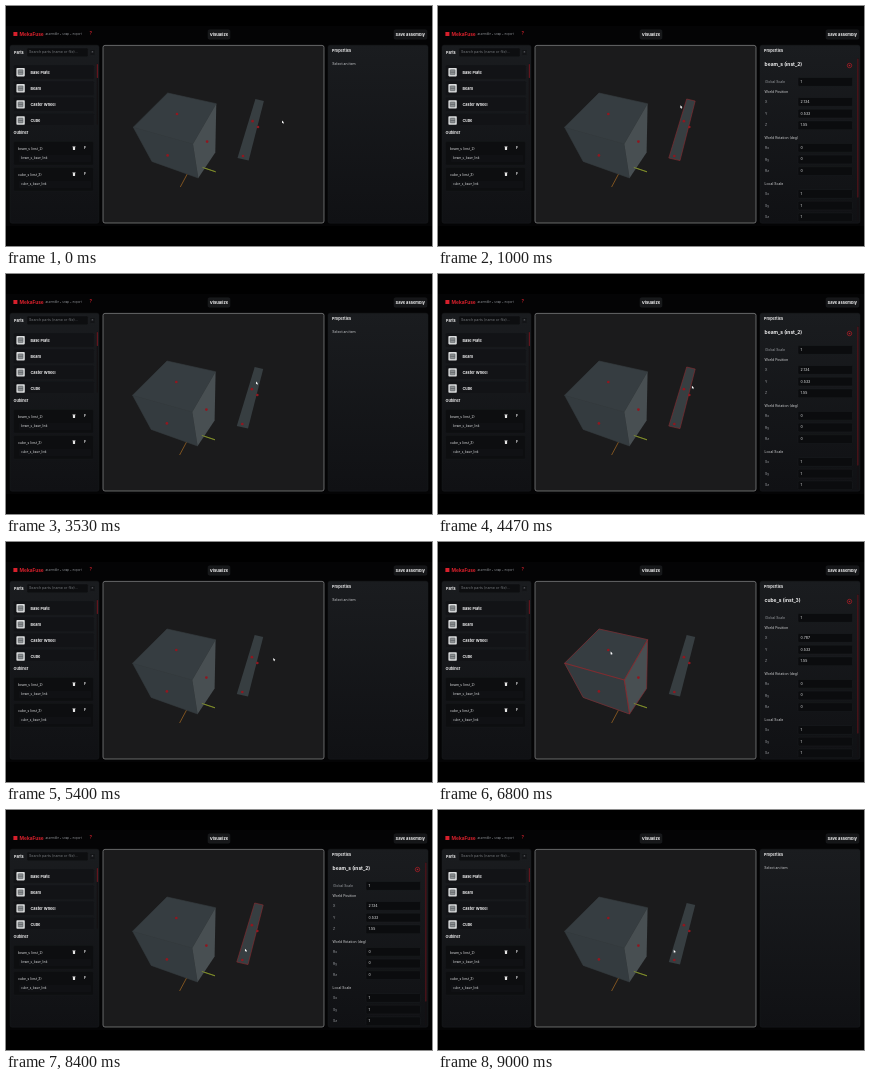
An HTML page with a canvas for the animation above (9070 ms loop, 426 by 240 pixels).

```html
<!DOCTYPE html>
<html lang="en">
<head>
<meta charset="utf-8">
<title>Part assembly</title>
<style>
html, body { margin: 0; width: 100%; height: 100%; overflow: hidden; background: #000; }
canvas { display: block; width: 100vw; height: 100vh; }
</style>
</head>
<body>
<canvas id="stage"></canvas>
<script>
const W = 426, H = 240, LOOP = 9070;
const canvas = document.getElementById('stage');
const ctx = canvas.getContext('2d');

// time, x, y of the pointer tip
const PATH = [
  [0, 276, 114.4], [500, 249, 106], [750, 249, 106], [1400, 229, 86],
  [2130, 234, 89.3], [3530, 250, 107.4], [4235, 249, 110], [4900, 266, 116],
  [5400, 267.3, 115.9], [6165, 174, 110], [6800, 172.6, 109.6], [7170, 226, 120],
  [7800, 245.3, 137.6], [8135, 241, 138], [8765, 235.7, 139.8], [LOOP, 235.7, 139.8]
];
const PICKS = [
  [500, 1400, 'beam'], [4235, 4900, 'beam'], [6165, 7170, 'cube'], [8135, 8765, 'beam']
];
const ITEMS = {
  cube: { name: 'cube_s (inst_3)', pos: ['0.787', '0.533', '1.55'] },
  beam: { name: 'beam_s (inst_2)', pos: ['2.134', '0.533', '1.55'] }
};
const CUBE = {
  top: [[126.6, 121.2], [161, 87], [209.6, 97.7], [186.3, 138]],
  front: [[126.6, 121.2], [186.3, 138], [191.6, 172], [145.2, 155.4]],
  side: [[186.3, 138], [209.6, 97.7], [208.6, 146.5], [191.6, 172]]
};
const BEAM = [[248.7, 93], [257.2, 95], [242, 154.6], [230.8, 152]];
const DOTS = [[170.3, 108], [160.9, 149.4], [200.4, 135.6], [245.9, 115.2], [251.3, 121], [236.3, 150]];

function box(x, y, w, h, r, fill, stroke, line = 0.5) {
  ctx.beginPath();
  ctx.roundRect(x, y, w, h, r);
  if (fill) { ctx.fillStyle = fill; ctx.fill(); }
  if (stroke) { ctx.strokeStyle = stroke; ctx.lineWidth = line; ctx.stroke(); }
}

function text(s, x, y, size, color = '#e6e7e9', weight = 400, align = 'left') {
  ctx.font = `${weight} ${size}px Inter, sans-serif`;
  ctx.fillStyle = color;
  ctx.textAlign = align;
  ctx.textBaseline = 'middle';
  ctx.fillText(s, x, y);
}

function poly(points, fill, stroke) {
  ctx.beginPath();
  points.forEach(([x, y]) => ctx.lineTo(x, y));
  ctx.closePath();
  if (fill) { ctx.fillStyle = fill; ctx.fill(); }
  if (stroke) { ctx.strokeStyle = stroke; ctx.lineWidth = 0.6; ctx.stroke(); }
}

function line(x1, y1, x2, y2, color, width = 0.7) {
  ctx.beginPath();
  ctx.moveTo(x1, y1);
  ctx.lineTo(x2, y2);
  ctx.strokeStyle = color;
  ctx.lineWidth = width;
  ctx.stroke();
}

function dot(x, y, r, color) {
  ctx.beginPath();
  ctx.arc(x, y, r, 0, Math.PI * 2);
  ctx.fillStyle = color;
  ctx.fill();
}

function panel(x, w) {
  const g = ctx.createLinearGradient(0, 39, 0, 217);
  g.addColorStop(0, '#1a1c1f');
  g.addColorStop(1, '#101114');
  box(x, 39.2, w, 178, 2, g, '#1d1f22', 0.4);
}

function header() {
  box(7.4, 26, 4, 4, 0, '#d8202c');
  text('MekaFuse', 13.6, 28.2, 4.8, '#d8202c', 700);
  text('assemble • snap • export', 39.4, 28.3, 3, '#8d9095');
  text('?', 84.7, 28, 4.6, '#d8202c', 600, 'center');
  box(202, 23.8, 22, 9.4, 1.5, '#17181a', '#222427', 0.4);
  text('Visualize', 213, 28.5, 4.1, '#f2f2f3', 700, 'center');
  box(388, 23.8, 33, 9.4, 1.5, '#151618', '#202225', 0.4);
  text('Save assembly', 404.3, 28.5, 4, '#f2f2f3', 700, 'center');
}

function partIcon(y) {
  box(10.4, y - 4.2, 8.4, 8.4, 0.8, '#d9dbdc');
  box(12.2, y - 2.4, 4.8, 4.8, 0.4, '#8c9092', '#45494c', 0.5);
  line(12.4, y, 16.8, y, '#45494c', 0.5);
}

function trash(x, y) {
  box(x - 1.1, y - 1, 2.2, 2.8, 0.3, '#e8e8e8');
  line(x - 1.5, y - 1.5, x + 1.5, y - 1.5, '#e8e8e8', 0.6);
}

function leftPanel() {
  panel(4, 89);
  text('Parts', 8, 46.6, 3.8, '#f0f0f1', 700);
  box(21, 42, 61, 8.8, 1.3, '#0d0e10', '#1f2124', 0.4);
  text('Search parts (name or file)...', 23, 46.4, 3.65, '#74777b');
  box(84, 43.4, 5, 6, 1, '#131417', '#232528', 0.4);
  text('×', 86.5, 46.4, 3.6, '#8d9095', 400, 'center');

  ctx.save();
  ctx.beginPath();
  ctx.rect(5, 57, 88, 62);
  ctx.clip();
  ['Base Plate', 'Beam', 'Caster Wheel', 'Cube'].forEach((name, i) => {
    const y = 66.2 + i * 16.1;
    box(7.5, y - 7.3, 80.5, 14.4, 1.5, '#121316', '#1a1c1f', 0.4);
    partIcon(y);
    text(name, 24.5, y + 0.2, 3.8, '#eeeeef', 700);
  });
  ctx.restore();
  box(90.8, 57.5, 1.1, 61, 0.5, '#151113');
  box(90.8, 58, 1.1, 14, 0.5, '#6b1820');

  text('Outliner', 7.5, 127, 3.8, '#f0f0f1', 700);
  ['beam', 'cube'].forEach((key, i) => {
    const y = 142.3 + i * 26;
    box(7.5, y - 6.7, 80, 23.5, 1.5, '#0d0e10', '#191b1e', 0.4);
    text(ITEMS[key].name, 12, y + 0.2, 3.35, '#dcdddf');
    trash(68, y - 0.2);
    text('F', 79, y - 0.2, 3.7, '#eeeeef', 600, 'center');
    box(13, y + 6.6, 72, 7, 1, '#101114');
    text(`${key}_s_base_link`, 15, y + 10, 3.1, '#d2d3d5');
  });
}

function field(label, value, y) {
  text(label, 327, y, 3.4, '#9b9ea3');
  box(360, y - 4.5, 54.5, 8.8, 1.3, '#0b0c0e', '#202225', 0.4);
  text(value, 362.6, y - 0.2, 3.6, '#e4e5e7');
}

function rightPanel(pick) {
  panel(322, 100);
  text('Properties', 326, 45.2, 3.75, '#f0f0f1', 700);
  if (!pick) {
    text('Select an item', 326.3, 57.6, 3.5, '#c9cbce');
    return;
  }
  const item = ITEMS[pick];
  ctx.save();
  ctx.beginPath();
  ctx.rect(322, 50, 100, 167);
  ctx.clip();
  text(item.name, 326.6, 58.9, 4.9, '#f0f0f1', 700);
  ctx.beginPath();
  ctx.arc(411.5, 59.5, 2.2, 0, Math.PI * 2);
  ctx.strokeStyle = '#b71d28';
  ctx.lineWidth = 0.7;
  ctx.stroke();
  dot(411.5, 59.5, 0.8, '#b71d28');

  field('Global Scale', '1', 76);
  const groups = [
    ['World Position', 86.3, ['X', 'Y', 'Z'], item.pos],
    ['World Rotation (deg)', 132.2, ['Rx', 'Ry', 'Rz'], ['0', '0', '0']],
    ['Local Scale', 178.3, ['Sx', 'Sy', 'Sz'], ['1', '1', '1']]
  ];
  groups.forEach(([title, y, labels, values]) => {
    text(title, 326.6, y, 3.45, '#d2d3d5');
    labels.forEach((label, i) => field(label, values[i], y + 9.7 + i * 11.7));
  });
  box(419.3, 52, 1.1, 163, 0.5, '#151113');
  box(419.3, 52.5, 1.1, 139, 0.5, '#5c151c');
  ctx.restore();
}

function scene(t, pick) {
  box(97, 39.4, 221, 177.6, 2, '#1b1b1c', '#8b8d8f', 0.7);
  const shift = 0.7 * (1 - smooth(Math.min(1, t / 1000)));
  const edge = '#8c2a30';
  ctx.save();
  ctx.translate(shift, 0);
  line(180.8, 167.5, 173.6, 181, '#a86a22');
  line(194, 160.8, 209, 165.8, '#8a9a2c');
  poly(CUBE.front, '#343b3f', '#343b3f');
  poly(CUBE.top, '#363d41', '#363d41');
  poly(CUBE.side, '#484f52');
  poly(BEAM, '#373e41');
  line(195.8, 161.4, 209, 165.8, '#8a9a2c');
  if (pick === 'cube') Object.values(CUBE).forEach(face => poly(face, null, edge));
  if (pick === 'beam') poly(BEAM, null, edge);
  DOTS.forEach(([x, y]) => dot(x, y, 1.35, '#8f1820'));
  ctx.restore();
}

function smooth(u) {
  return u * u * (3 - 2 * u);
}

function pointer(t) {
  const i = PATH.findIndex(p => p[0] > t);
  const [t0, x0, y0] = PATH[i - 1];
  const [t1, x1, y1] = PATH[i];
  const u = smooth((t - t0) / (t1 - t0));
  const x = x0 + (x1 - x0) * u, y = y0 + (y1 - y0) * u;
  const shape = [[0, 0], [0, 2.9], [0.7, 2.3], [1.2, 3.4], [1.7, 3.1], [1.3, 2.1], [2.1, 2]];
  poly(shape.map(([dx, dy]) => [x + dx, y + dy]), '#fff');
}

function resize() {
  const ratio = window.devicePixelRatio || 1;
  canvas.width = Math.round(innerWidth * ratio);
  canvas.height = Math.round(innerHeight * ratio);
}

function draw() {
  const t = performance.now() % LOOP;
  const hit = PICKS.find(([from, to]) => t >= from && t < to);
  const pick = hit && hit[2];
  ctx.setTransform(canvas.width / W, 0, 0, canvas.height / H, 0, 0);
  ctx.fillStyle = '#000';
  ctx.fillRect(0, 0, W, H);
  ctx.fillStyle = '#040405';
  ctx.fillRect(0, 20, W, 200);
  header();
  leftPanel();
  scene(t, pick);
  rightPanel(pick);
  pointer(t);
  requestAnimationFrame(draw);
}

addEventListener('resize', resize);
resize();
draw();
</script>
</body>
</html>
```
